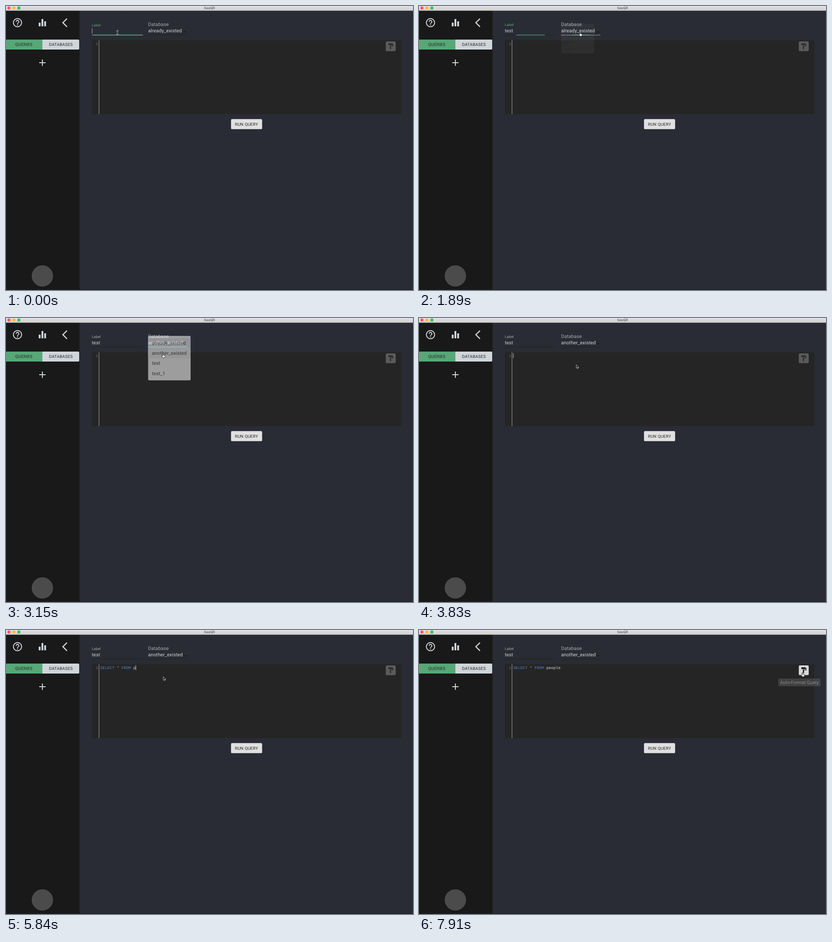
Write an HTML page that moves like this. It is 895 px wide and 626 px high and loops after 8 s.

```html
<!DOCTYPE html>
<html lang="en">
<head>
<meta charset="utf-8">
<title>SeeQR</title>
<style>
  html, body { margin: 0; width: 100%; height: 100%; overflow: hidden; background: #292c34; }
  svg { display: block; width: 895px; height: 626px; }
  text { font: 10.45px Roboto, sans-serif; letter-spacing: .00938em; fill: #d0d3d7; text-rendering: geometricPrecision; white-space: pre; }
  .small { font-size: 7.84px; }
  .choice { font-size: 10.6px; }
  .button { font-size: 9.14px; letter-spacing: .02857em; fill: #202422; }
  .code { font: 8.67px "Liberation Mono", monospace; letter-spacing: 0; }
  .keyword { fill: #5288cf; }
  .star { fill: #a6a283; }
  .plain { fill: #dedede; }
  #menu text { fill: #424242; }
</style>
</head>
<body>
<svg viewBox="0 0 895 626">
  <defs>
    <linearGradient id="bar" x2="0" y2="1">
      <stop stop-color="#e3e1e3"/><stop offset="1" stop-color="#d0ced0"/>
    </linearGradient>
  </defs>
  <rect width="895" height="626" fill="#292c34"/>
  <rect y="10" width="161.7" height="616" fill="#191919"/>
  <rect y="624.8" width="895" height="1.2" fill="#1c1d21"/>
  <rect width="895" height="10.4" fill="url(#bar)"/>
  <circle cx="6.5" cy="4.5" r="3.4" fill="#fc5b57"/>
  <circle cx="17.4" cy="4.5" r="3.4" fill="#fdbc40"/>
  <circle cx="28.3" cy="4.5" r="3.4" fill="#34c84a"/>
  <text x="447.5" y="7.4" text-anchor="middle" style="font:7.3px Inter,sans-serif;fill:#3c3c3c">SeeQR</text>

  <!-- Sidebar -->
  <g fill="#d0d5d9">
    <path transform="translate(13.3 24.8)" d="M11 18h2v-2h-2v2zm1-16C6.48 2 2 6.48 2 12s4.48 10 10 10 10-4.48 10-10S17.52 2 12 2zm0 18c-4.41 0-8-3.59-8-8s3.59-8 8-8 8 3.59 8 8-3.59 8-8 8zm0-14c-2.21 0-4 1.79-4 4h2c0-1.1.9-2 2-2s2 .9 2 2c0 2-3 1.75-3 5h2c0-2.25 3-2.5 3-5 0-2.21-1.79-4-4-4z"/>
    <path transform="translate(68 24.8)" d="M10 20h4V4h-4v16zm-6 0h4v-8H4v8zM16 9v11h4V9h-4z"/>
    <path transform="translate(123.3 24.8)" d="M11.67 3.87L9.9 2.1 0 12l9.9 9.9 1.77-1.77L3.54 12z"/>
    <path transform="translate(68 113)" d="M19 13h-6v6h-2v-6H5v-2h6V5h2v6h6v2z"/>
    <path d="M80 74h79q2 0 2 2v18q0 2-2 2h-79z"/>
  </g>
  <rect y="74" width="80" height="22" fill="#57a777"/>
  <text class="button" x="39.3" y="88.2" text-anchor="middle">QUERIES</text>
  <text class="button" x="120.7" y="88.2" text-anchor="middle">DATABASES</text>
  <circle cx="80" cy="595" r="23.5" fill="#4b4b4b"/>

  <!-- Fields -->
  <text id="label" class="small" x="188.8">Label</text>
  <text id="input" x="188.8" y="58.4"></text>
  <rect id="inputBase" x="189" y="63.8" width="112.5" height=".7"/>
  <rect id="inputLine" y="63.3" height="1.3" fill="#57a777"/>
  <rect id="inputCaret" y="48.7" width=".8" height="12.3" fill="#d0d3d7"/>
  <text class="choice" x="312.4" y="43.7" style="fill:#a9abae">Database</text>
  <text id="database" class="choice" x="312.4" y="58.4"></text>
  <path id="arrow" d="M390.8 55.8l3.3 3.3 3.3-3.3z" fill="#181a1f"/>
  <rect id="selectBase" x="312.5" y="63.8" width="86.5" height=".7"/>
  <rect id="selectLine" y="63.3" height="1.3" fill="#57a777"/>

  <!-- Editor -->
  <rect x="189" y="75.5" width="680.3" height="162.8" rx="2" fill="#252525"/>
  <rect x="204" y="75.5" width="1" height="162.8" fill="#a6a6a6"/>
  <text class="code" x="197.6" y="86.2" style="fill:#747474">1</text>
  <text class="code" x="207.3" y="86.2"><tspan id="select"></tspan><tspan id="star" class="star"></tspan><tspan id="from"></tspan><tspan id="table" class="plain"></tspan></text>
  <rect id="codeCaret" y="77.6" width=".8" height="11" fill="#e0e0e0"/>
  <rect id="format" x="835.2" y="78" width="21.8" height="21.6" rx="2.4"/>
  <path id="roller" transform="translate(838.2 81) scale(.653)" d="M18 4V3c0-.55-.45-1-1-1H5c-.55 0-1 .45-1 1v4c0 .55.45 1 1 1h12c.55 0 1-.45 1-1V6h1v4H9v11c0 .55.45 1 1 1h2c.55 0 1-.45 1-1v-9h8V4h-3z"/>
  <rect x="494.9" y="250.4" width="68.2" height="22" rx="2.8" fill="#000" opacity=".2"/>
  <rect x="494.8" y="249.3" width="68.4" height="22.2" rx="2.6" fill="#e0e0e0"/>
  <text class="button" x="529" y="263.5" text-anchor="middle">RUN QUERY</text>

  <!-- Overlays -->
  <g id="menu">
    <rect x="311.8" y="40.4" width="94.9" height="98.4" rx="3" fill="#000" opacity=".25"/>
    <rect x="312.5" y="39.6" width="93.5" height="97.8" rx="2.6" fill="#fff"/>
    <rect x="312.5" y="44" width="93.5" height="22.3" fill="#e9e9e9"/>
    <rect id="hover" x="312.5" y="66.3" width="93.5" height="22.2" fill="#f3f3f3"/>
    <text class="choice" x="321" y="59">already_existed</text>
    <text class="choice" x="321" y="81.2">another_existed</text>
    <text class="choice" x="321" y="103.4">test</text>
    <text class="choice" x="321" y="125.6">test_1</text>
  </g>
  <g id="tooltip">
    <rect x="790" y="107" width="93" height="17" rx="2.6" fill="#616161"/>
    <text x="836.5" y="118.7" text-anchor="middle" style="font-size:10.1px;letter-spacing:0;fill:#fff">Auto-Format Query</text>
  </g>

  <!-- Pointers, with the hot spot at 0,0 -->
  <g id="pointers" stroke-linejoin="round">
    <g id="beam" fill="none">
      <path d="M-2.4-4Q0-4 0-2.6Q0-4 2.4-4M0-2.6V2.6M-2.4 4Q0 4 0 2.6Q0 4 2.4 4M-1.2 1H1.2" stroke="#ddd" stroke-width="1.8"/>
      <path d="M-2.4-4Q0-4 0-2.6Q0-4 2.4-4M0-2.6V2.6M-2.4 4Q0 4 0 2.6Q0 4 2.4 4M-1.2 1H1.2" stroke="#111" stroke-width=".8"/>
    </g>
    <path id="pointer" d="M0 0V7.3L1.8 5.7L3 8.2L4.2 7.6L3.1 5.2H5.3z" fill="#000" stroke="#eee" stroke-width=".8"/>
    <path id="hand" d="M-1.1.3Q-.3-.7.6.3L1.2 3L4.2 3.7Q5.1 4.3 4.7 6.2L4 8.5H.2L-2.9 5.2Q-2.9 4-1.3 4.7L-.4 5z" fill="#f4f4f4" stroke="#111" stroke-width=".8"/>
  </g>
</svg>
<script>
const LOOP = 8000;
const QUERY = "SELECT * FROM people";
const CHAR_WIDTH = 5.2;
const el = Object.fromEntries([...document.querySelectorAll("[id]")].map(e => [e.id, e]));

// Each track is a list of [start time, value]; a value holds until the next one.
const tracks = {
  labelY: [[0, 44.5], [240, 44]],
  typed: [[0, 0], [390, 1], [570, 2], [720, 3], [900, 4]],
  inputFocus: [[0, .97], [240, 1], [1890, .56], [2040, 0]],
  inputHover: [[0, 1], [1560, 0]],
  inputCaret: [[0, 1], [1890, 0]],
  selectFocus: [[0, 0], [1890, .45], [2040, 1], [3650, .5], [3830, 0]],
  selectHover: [[0, 0], [1710, 1], [2040, 0]],
  menu: [[0, 0], [1890, .04], [2040, .75], [2220, 1], [3150, .55], [3330, 0]],
  menuGrow: [[0, 0], [1890, .2], [2040, .85], [2220, 1]],
  itemHover: [[0, 0], [2370, 1]],
  chosen: [[0, "already_existed"], [3150, "another_existed"]],
  codeLength: [[0, 0], [4310, 2], [4640, 3], [4790, 5], [4940, 6], [5090, 8], [5240, 9], [5390, 11],
    [5540, 12], [5690, 14], [5840, 15], [5990, 16], [6140, 18], [6290, 19], [6440, 20]],
  codeCaret: [[0, 0], [3830, 1], [6890, 0], [7400, 1], [7910, 0]],
  formatHover: [[0, 0], [7580, 1]],
  tooltip: [[0, 0], [7910, .45]],
  cursor: [[0, ["beam", 245, 58.3]], [1380, ["beam", 270, 58]], [1560, ["hand", 330, 57]],
    [1710, ["hand", 353, 57.5]], [1890, ["hand", 354, 58]], [2220, ["hand", 354.7, 62.5]],
    [2370, ["hand", 345, 79]], [3480, ["pointer", 345, 95]], [3650, ["pointer", 346, 103.3]],
    [6890, ["pointer", 365, 105]], [7070, ["pointer", 520, 115]], [7220, ["pointer", 701.5, 117.5]],
    [7400, ["pointer", 805, 108]], [7580, ["hand", 842, 95]], [7730, ["hand", 843, 94.5]]],
};

const valueAt = (track, t) => track.findLast(([start]) => start <= t)[1];
const set = (e, attrs) => { for (const name in attrs) e.setAttribute(name, attrs[name]); };
const show = (e, visible) => set(e, { opacity: +visible });
const growLine = (e, center, width, scale) =>
  set(e, { x: center - width * scale / 2, width: width * scale });
const baseColor = hovered => ({ fill: hovered ? "#d0d3d7" : "#1c1e22" });

function drawCode(length, caret) {
  const part = (from, to) => QUERY.slice(from, Math.min(to, length));
  el.select.textContent = part(0, 7);
  el.star.textContent = part(7, 9);
  el.from.textContent = part(9, 14);
  el.table.textContent = part(14, 20);
  el.select.setAttribute("class", length >= 6 ? "keyword" : "plain");
  el.from.setAttribute("class", length >= 13 ? "keyword" : "plain");
  set(el.codeCaret, { x: 207.2 + length * CHAR_WIDTH, opacity: caret });
}

function draw(t) {
  const s = {};
  for (const name in tracks) s[name] = valueAt(tracks[name], t);

  set(el.label, { y: s.labelY });
  el.label.style.fill = s.inputFocus ? "#57a777" : "#a9abae";
  el.input.textContent = "test".slice(0, s.typed);
  set(el.inputBase, baseColor(s.inputHover));
  growLine(el.inputLine, 245.2, 112.5, s.inputFocus);
  set(el.inputCaret, { x: 189 + el.input.getComputedTextLength(), opacity: s.inputCaret });

  el.database.textContent = s.chosen;
  set(el.selectBase, baseColor(s.selectHover));
  growLine(el.selectLine, 355.8, 86.5, s.selectFocus);
  set(el.arrow, { transform: s.menu ? "rotate(180 394.1 57.2)" : "" });

  const scaleX = .72 + .28 * s.menuGrow, scaleY = .58 + .42 * s.menuGrow;
  set(el.menu, {
    opacity: s.menu,
    transform: `translate(312.5 39.6) scale(${scaleX} ${scaleY}) translate(-312.5 -39.6)`,
  });
  show(el.hover, s.itemHover);

  drawCode(s.codeLength, s.codeCaret);
  set(el.format, { fill: s.formatHover ? "#d8d8d8" : "#5b5b5b" });
  set(el.roller, { fill: s.formatHover ? "#151515" : "#2b2b2b" });
  set(el.tooltip, { opacity: s.tooltip });

  const [shape, x, y] = s.cursor;
  set(el.pointers, { transform: `translate(${x} ${y})` });
  for (const name of ["beam", "pointer", "hand"]) show(el[name], name === shape);
}

const start = performance.now();
function tick() {
  draw((performance.now() - start) % LOOP);
  requestAnimationFrame(tick);
}
tick();
</script>
</body>
</html>
```
